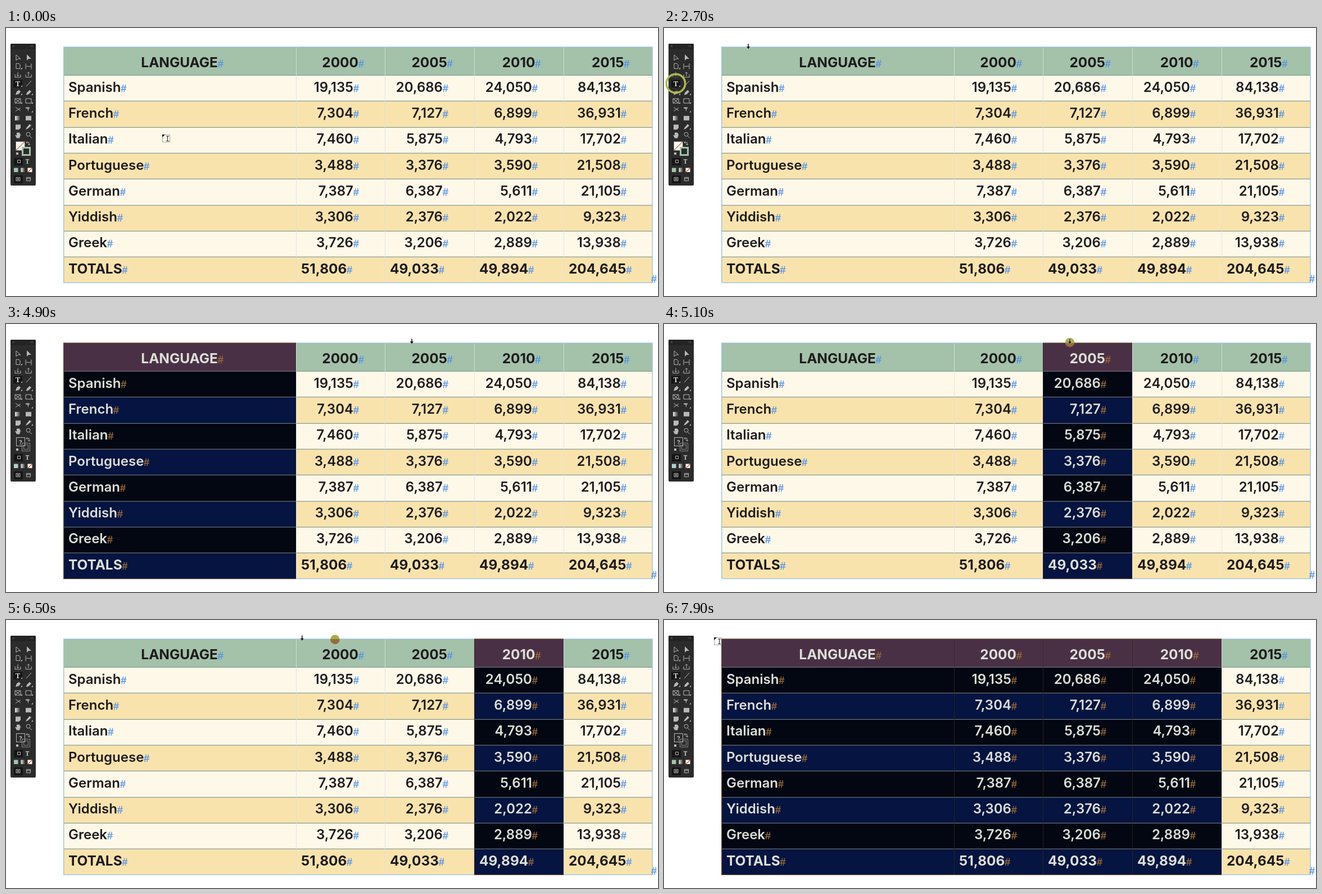
Animation, 1160 px wide and 478 px high, one loop 8000 ms. Source, as an HTML page:

```html
<!DOCTYPE html>
<html lang="en">
<head>
<meta charset="utf-8">
<title>Selecting table columns</title>
<style>
html, body { margin: 0; width: 100%; height: 100%; overflow: hidden; background: #fff; }
svg { display: block; }
.col { --head: #a3c2a9; --odd: #fef8e9; --even: #f9e3ad; --ink: #1e1b1d; --hash: #5593e8; --rule: #8a9f96; --side: #d9e1dc; --edge: #9cc3dc; }
.col.on { --head: #4a3045; --odd: #020712; --even: #051440; --ink: #dcdfd7; --hash: #9d6b38; --rule: #666a70; --side: #33291f; --edge: #5b4231; }
.cell { font: 600 24px Inter, "Open Sans", sans-serif; fill: var(--ink); }
.bold { font-weight: 700; font-size: 24.4px; }
.hash { font: 17.5px "Liberation Sans", sans-serif; fill: var(--hash); stroke: var(--hash); stroke-width: .4; }
.line { fill: none; stroke: #b8b8b8; }
.solid { fill: #b8b8b8; }
.well { fill: #151515; }
.glyph { font: 700 10px "Noto Serif", serif; fill: #d0d0d0; text-anchor: middle; }
</style>
</head>
<body>
<svg width="1160" height="478" viewBox="0 0 1160 478">
  <defs>
    <clipPath id="above"><rect width="1160" height="34"/></clipPath>
    <clipPath id="below"><rect y="34" width="1160" height="444"/></clipPath>
    <linearGradient id="fade"><stop stop-color="#eee"/><stop offset="1" stop-color="#222"/></linearGradient>
  </defs>
  <g id="table"></g>

  <rect x="8" y="28" width="45" height="253" rx="2" fill="#2b2b2b"/>
  <rect x="8" y="28" width="45" height="10" rx="2" fill="#232323"/>
  <path d="M12 31l3 3m0-3l-3 3M45 31l-1.500 1.500 1.500 1.500m3-3l-1.500 1.500 1.500 1.500" fill="none" stroke="#777" stroke-width=".7"/>
  <g id="tools"></g>
  <circle id="dim" cx="23" cy="99" r="14.300" fill="#2b2b2b" opacity=".75"/>
  <path d="M13 93h16v13h-16Z" class="well"/>
  <text x="21" y="104" class="glyph" style="font-size:13px">T</text>
  <path d="M29 102v3h-3Z" class="solid"/>

  <path d="M37 204h4v5m-3-7l-2 2 2 2m1 1l2 2 2-2" class="line"/>
  <path d="M18 222h4v4h-4Z" class="solid"/>
  <g id="plain">
    <rect x="17.500" y="202.500" width="16" height="16" fill="#fff" stroke="#666"/>
    <path d="M18 218L33 203" stroke="#c8843a" stroke-width="1.500"/>
    <rect x="29.500" y="213.500" width="13" height="13" fill="#2b2b2b" stroke="#a3c2a9" stroke-width="3"/>
  </g>
  <g id="mixed">
    <rect x="18.500" y="202.500" width="15" height="15" class="line"/>
    <text x="26" y="215" class="glyph">?</text>
    <path d="M28.500 212.500h14v14h-14Zm3 3h8v8h-8Z" fill="none" stroke="#888"/>
  </g>
  <path d="M14 232h16v13h-16ZM14 263h16v14h-16Z" class="well"/>
  <path d="M20.500 235.500h5v5h-5ZM18 266.500h7v6h-7Zm2 2h3v2h-3ZM36.500 266.500h7v6h-7Zm0 2h7" class="line"/>
  <text x="38" y="242" class="glyph">T</text>
  <rect id="chip" x="14" y="249.500" width="7.500" height="7.500"/>
  <rect x="26.500" y="249.500" width="8" height="7.500" fill="url(#fade)"/>
  <rect x="38.500" y="249.500" width="8" height="7.500" fill="#fff"/>
  <path d="M39 257L46 250" stroke="#e05a3a" stroke-width="1.500"/>
  <circle id="ring" cx="21" cy="99" fill="none" stroke="#adb84e" stroke-width="3.600"/>

  <g id="press">
    <g clip-path="url(#above)"><circle r="8.300"/></g>
    <g clip-path="url(#below)"><circle r="8.300"/></g>
  </g>
  <path id="arrow" d="M-1 -5h2v5h2.500L0 5 -3.500 0H-1Z" fill="#111" stroke="#fff" stroke-width=".5"/>
  <g id="beam">
    <rect x="-6.500" y="-6.500" width="13" height="13" fill="none" stroke="#555" stroke-dasharray="1 1"/>
    <path d="M-7 -7h5l-5 5Z" fill="#111"/>
    <path d="M0 -4h5M2.500 -4V4.500M0 4.500h5" fill="none" stroke="#222"/>
  </g>
  <path id="pointer" d="M0 0V13l3-3 2 5 2-1 -2-5h4Z" fill="#111" stroke="#fff" stroke-width=".8"/>
</svg>
<script>
const $ = id => document.getElementById(id);

function add(parent, tag, attrs, text) {
  const el = document.createElementNS('http://www.w3.org/2000/svg', tag);
  for (const k in attrs) el.setAttribute(k, attrs[k]);
  if (text) el.textContent = text;
  return parent.appendChild(el);
}

// Tool icons, two per row, each drawn around its own centre; * marks a flyout
const box = 'M-5 -4h10v8h-10Z';
const tray = 'M-5 -1v5h10v-5';
const icons = [
  ['line', 'M-3 -5v10l3-3h5Z'], ['solid', 'M-3 -6v11l3-3h5Z'],
  ['line*', 'M-3 -5h5l2 2v7h-7Z'], ['line', 'M-5 -5v10M5 -5v10M-4 0h8'],
  ['line', tray + 'M0 -5v7l-2-2m2 2l2-2'], ['line', tray + 'M0 2v-7l-2 2m2-2l2 2'],
  ['', ''], ['line', 'M-4 5l9-10'],
  ['solid*', 'M-4 5l2-6 4-3 3 3-3 4Z'], ['solid*', 'M-4 5l1-4 5-5 3 3-5 5Z'],
  ['line*', box + 'l10 8m0-8l-10 8'], ['line*', box],
  ['line', 'M-4 -4l9 6m0-5l-9 6'], ['solid*', 'M-5 -4h7v2h-2v6l-2-6h-3Z'],
  ['fade', box], ['solid', box],
  ['solid', 'M-4 -4h9v6l-3 3h-6Z'], ['solid*', 'M-5 5l2-4 5-6 3 3-6 5Z'],
  ['solid', 'M-5 -1l3 1v-5h5l2 4-2 6h-5Z'], ['line', 'M2 1l4 4M-4 -2a3.500 3.500 0 1 1 7 0a3.500 3.500 0 1 1 -7 0']
];
icons.forEach(([kind, d], i) => {
  const g = add($('tools'), 'g', { transform: `translate(${i % 2 ? 40 : 21} ${53 + 15.4 * (i >> 1)})` });
  add(g, 'path', kind === 'fade' ? { d, fill: 'url(#fade)' } : { d, class: kind.replace('*', '') });
  if (kind.endsWith('*')) add(g, 'path', { d: 'M8 2v3h-3Z', class: 'solid' });
});

// Table: the header is centred, totals and names sit left, figures sit right
const rows = [
  'LANGUAGE 2000 2005 2010 2015',
  'Spanish 19,135 20,686 24,050 84,138',
  'French 7,304 7,127 6,899 36,931',
  'Italian 7,460 5,875 4,793 17,702',
  'Portuguese 3,488 3,376 3,590 21,508',
  'German 7,387 6,387 5,611 21,105',
  'Yiddish 3,306 2,376 2,022 9,323',
  'Greek 3,726 3,206 2,889 13,938',
  'TOTALS 51,806 49,033 49,894 204,645'
].map(r => r.split(' '));
const colLeft = c => c ? Math.round(515.7 + 158.6 * (c - 1)) : 102;
const rowTop = r => r ? Math.round(84 + 46.3 * (r - 1)) : 34;

const cols = rows[0].map((_, c) => {
  const g = add($('table'), 'g', { class: 'col' });
  const x = colLeft(c), right = colLeft(c + 1), width = right - x;
  const bar = (x, y, width, height, fill) => add(g, 'rect', { x, y, width, height, fill: `var(--${fill})` });
  rows.forEach((row, r) => {
    const y = rowTop(r), last = r === rows.length - 1;
    bar(x, y, width, rowTop(r + 1) - y, r ? (r % 2 ? 'odd' : 'even') : 'head');
    if (r) bar(x, y - .3, width, 1.3, 'rule');
    const [anchor, tx] = !r ? ['middle', (x + right) / 2 + 4.5]
      : !c || last ? ['start', x + 9]
      : ['end', right - 46.3];
    const label = add(g, 'text', {
      class: r && !last ? 'cell' : 'cell bold',
      x: tx, y: r ? 113.8 + 46.25 * (r - 1) : 70, 'text-anchor': anchor
    }, row[c]);
    add(label, 'tspan', { class: 'hash' }, '#');
  });
  if (c) bar(x, 34, .8, 420, 'side');
  else bar(x, 34, 1.4, 420, 'edge');
  if (right === 1150) bar(right - .7, 34, 1.4, 420, 'edge');
  bar(x, 33.3, width, 1.3, 'edge');
  bar(x, 453.7, width, 1.3, 'edge');
  return g;
});
add(add($('table'), 'g', { class: 'col' }), 'text', { class: 'hash', x: 1148, y: 454 }, '#');

// Cursor moves: start, end, x, y
const moves = [
  [0, 1200, 27, 101], [1700, 2500, 150, 33], [3600, 4400, 722, 31], [5200, 5700, 941, 36],
  [6000, 6660, 483, 32], [6900, 7200, 455, 15], [7420, 7900, 96, 38]
];
const ease = u => u * u * u * (10 - 15 * u + 6 * u * u);
const clamp = u => Math.min(1, Math.max(0, u));
const cursorAt = t => moves.reduce(([x, y], [from, to, nx, ny]) => {
  const k = ease(clamp((t - from) / (to - from)));
  return [x + (nx - x) * k, y + (ny - y) * k];
}, [285, 197]);

// Selections: start, first and last column
const picks = [[3600, 0, 0], [5100, 2, 2], [6200, 3, 3], [6600, 2, 3], [6700, 1, 3], [6800, 0, 3]];
const presses = [[3400, 3700], [5000, 5300], [6000, 7000]];
const show = (id, on) => $(id).style.display = on ? '' : 'none';
const place = (el, [x, y]) => el.setAttribute('transform', `translate(${x} ${y})`);

function draw(t) {
  const pick = picks.filter(p => p[0] <= t).pop();
  cols.forEach((g, c) => g.classList.toggle('on', !!pick && c >= pick[1] && c <= pick[2]));
  show('plain', !pick);
  show('mixed', pick);
  $('chip').setAttribute('fill', t >= 3600 && t < 5600 ? '#afd0cb' : '#a3c2a9');

  const ringOn = t >= 800 && t < 4400;
  show('ring', ringOn);
  show('dim', ringOn);
  $('ring').setAttribute('r', 16.7 + 11 * Math.sin(Math.PI * clamp((t - 900) / 800)));
  $('ring').style.opacity = clamp((4400 - t) / 300);

  const pos = cursorAt(t);
  const kind = t >= 2300 && t < 7800 ? 'arrow' : pos[0] < 55 ? 'pointer' : 'beam';
  for (const id of ['arrow', 'beam', 'pointer']) show(id, id === kind);
  place($(kind), pos);

  // The press marker trails the cursor and blends with what lies below
  show('press', presses.some(([a, b]) => t >= a && t < b));
  const [x, y] = cursorAt(t - 66);
  const tints = t < 6800 ? ['#a6ad45', '#946b3e'] : ['#b5ab48', '#8c8244'];
  document.querySelectorAll('#press circle').forEach((dot, i) => {
    place(dot, [x, y + 2]);
    dot.setAttribute('fill', tints[i]);
  });
}

const start = performance.now();
function tick() {
  const t = (performance.now() - start) % 8000;
  draw(Math.floor(t / 100) * 100);
  requestAnimationFrame(tick);
}
tick();
</script>
</body>
</html>
```
